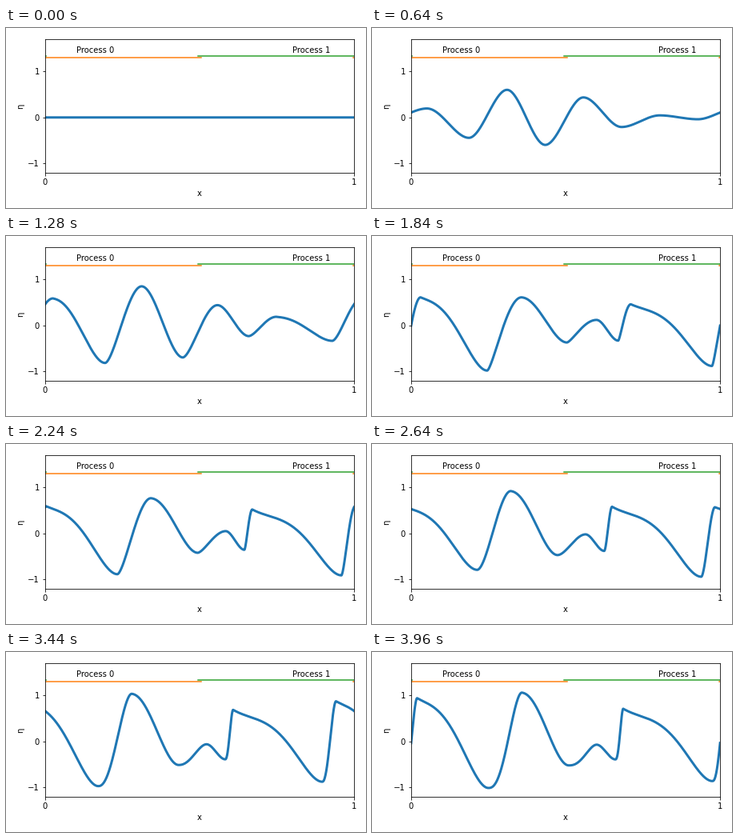
Recreate the animation shown at these times as a matplotlib script. Size 450 by 225 pixels, loop 4000 ms.

```python
import numpy as np
import matplotlib.pyplot as plt
from matplotlib.animation import FuncAnimation

W, H, DPI = 450, 225, 72
FRAMES, STEP = 100, 40


def ease(u):
    u = np.clip(u, 0, 1)
    return u * u * (3 - 2 * u)


def glide(t, times, values):
    """Ease from one key value to the next; values may be arrays."""
    i = min(max(np.searchsorted(times, t, side="right") - 1, 0),
            len(times) - 2)
    u = (t - times[i]) / (times[i + 1] - times[i])
    # Mostly linear, softened near the keys.
    u = .5 * np.clip(u, 0, 1) + .5 * ease(u)
    return values[i] + (values[i + 1] - values[i]) * u


# Four troughs and four crests in turn, evenly spaced at first.
k = np.arange(8)
home = .187 + .1235 * k
sign = np.where(k % 2, 1, -1)


def swell(base, depth, centre):
    """A carrier of four waves under a one-wave envelope."""
    return sign * (base + depth * np.cos(2 * np.pi * (home - centre)))


# Where nonlinear steepening takes each trough and crest.
drift = np.array([.049, .034, .062, .029, -.034, -.132, .033, -.046])
height_times = [0, 16, 32, 46, 66, 92]
heights = [
    0 * home,
    swell(.32, .30, .37),
    swell(.52, .34, .27),
    np.array([-.98, .61, -.37, .12, -.33, .46, -.88, .61]),
    np.array([-.79, .92, -.47, -.02, -.38, .58, -.94, .57]),
    np.array([-1.01, 1.06, -.52, -.07, -.39, .71, -.86, .94]),
]
sway_times = [0, 16, 32, 46, 66, 86, 99]
sway = [.02, 0, -.01, .018, -.022, -.064, .014]

x = np.linspace(0, 1, 1200)


def wave(t):
    px = home + drift * ease((t - 16) / 40) + glide(t, sway_times, sway)
    py = glide(t, height_times, heights)
    px, py = np.append(px, px[0] + 1), np.append(py, py[0])
    q = (x - px[0]) % 1 + px[0]
    i = np.clip(np.searchsorted(px, q, side="right") - 1, 0, 7)
    width = np.diff(px)
    u = (q - px[i]) / width[i]
    # Long falling limbs sag late; rising fronts change their lean in time.
    sag = np.where(k % 2, np.maximum(4.5 * (width - .13), 0), 0)
    lean = np.where(k % 2, 1 + sag, glide(t, [16, 46, 99], [1, .75, 1.3]))
    s = ease(u ** lean[i]) + sag[i] * u * (1 - u) ** 2
    return py[i] + (py[i + 1] - py[i]) * s


plt.rcParams.update({"font.family": "DejaVu Sans", "font.size": 10})
fig = plt.figure(figsize=(W / DPI, H / DPI), dpi=DPI, facecolor="white")
ax = fig.add_axes([48.9 / W, 44.1 / H, 386.2 / W, 167 / H])
ax.set(xlim=(0, 1), ylim=(-1.2, 1.7), xticks=[0, 1], yticks=[-1, 0, 1],
       xlabel="x", ylabel="η")
ax.set_xticklabels(["0", "1"])

line, = ax.plot(x, 0 * x, color="C0", lw=3)
for spans, y, color in (([(0, .505), (.997, 1)], 1.3, "C1"),
                        ([(.495, 1), (0, .003)], 1.335, "C2")):
    for span in spans:
        ax.plot(span, (y, y), color=color, lw=1.5)
ax.text(.1, 1.4, "Process 0")
ax.text(.8, 1.4, "Process 1")


def draw(n):
    line.set_ydata(wave(n))
    return line,


anim = FuncAnimation(fig, draw, frames=FRAMES, interval=STEP, repeat=True)
plt.show()
```
